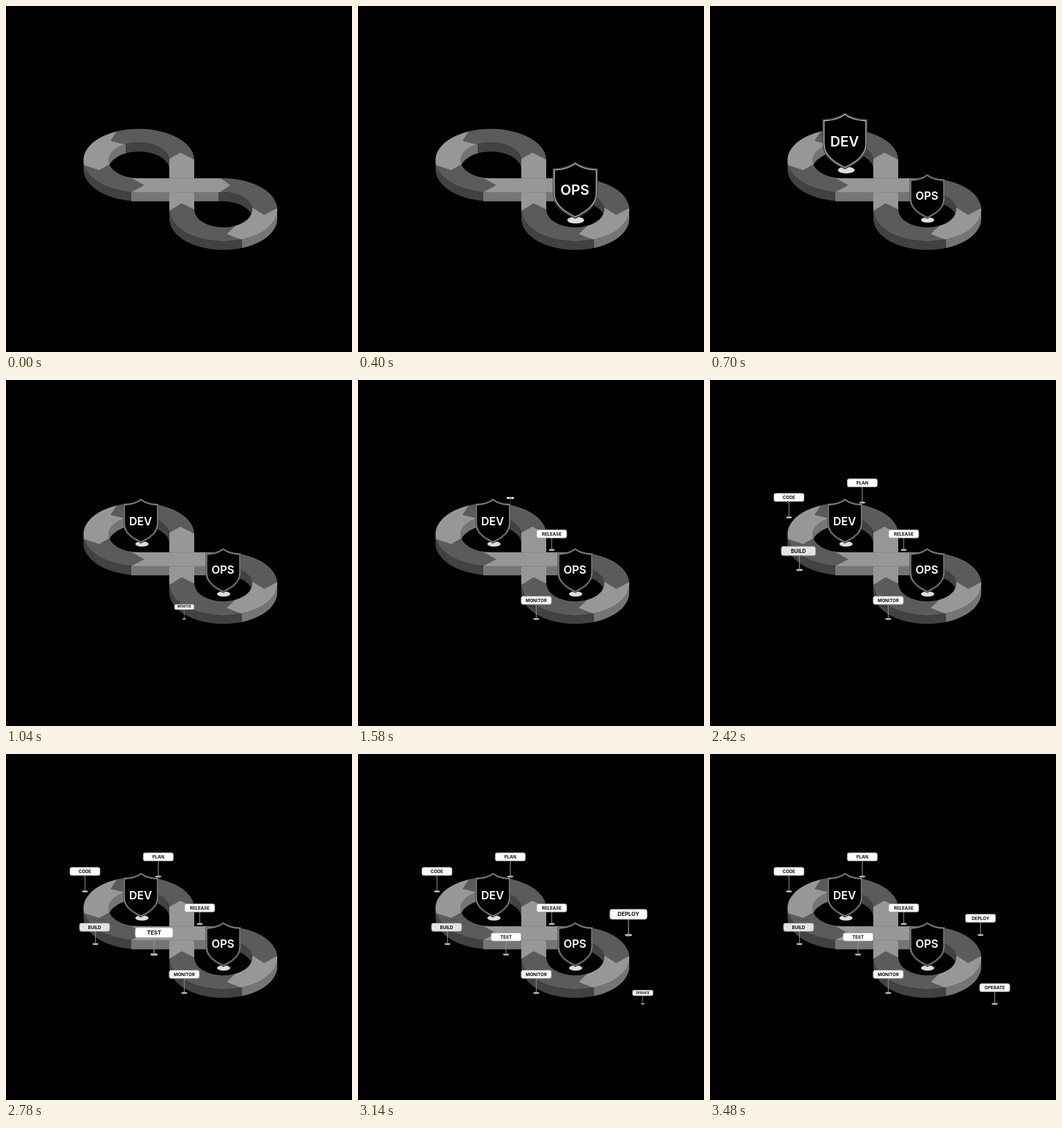
Recreate the animation shown at these times as an HTML page. Size 500 by 500 pixels, loop 3620 ms.

```html
<!DOCTYPE html>
<html lang="en">
<head>
<meta charset="utf-8">
<style>
html, body { margin: 0; width: 100%; height: 100%; overflow: hidden; background: #000; }
svg { display: block; width: 100vw; height: 100vh; }
text { font-family: Inter, "Liberation Sans", sans-serif; text-anchor: middle; }
.dark { fill: #5b5b5b; }
.light { fill: #979797; }
.wall { fill: #424242; }
.lightwall { fill: #757575; }
</style>
</head>
<body>
<svg viewBox="0 0 500 500">
  <defs>
    <path id="holeL" d="M236 223A44 26 0 0 0 148 223A44 26 0 0 0 192 249H236Z"/>
    <path id="holeR" d="M272 269H314A42 25.5 0 0 1 356 294.5A42 25.5 0 0 1 272 294.5Z"/>
    <path id="face" clip-rule="evenodd" fill-rule="evenodd" d="
      M272 223A80 45.5 0 0 0 112 223A80 46 0 0 0 192 269H236V294.5
      A78 45.5 0 0 0 392 294.5A78 45.5 0 0 0 314 249H272Z
      M236 223A44 26 0 0 0 148 223A44 26 0 0 0 192 249H236Z
      M272 269H314A42 25.5 0 0 1 356 294.5A42 25.5 0 0 1 272 294.5Z"/>
    <path id="rim" d="M236 294.5A78 45.5 0 0 0 392 294.5V307A78 45.5 0 0 1 236 307Z"/>
    <clipPath id="cFace"><use href="#face"/></clipPath>
    <clipPath id="cL"><use href="#holeL"/></clipPath>
    <clipPath id="cR"><use href="#holeR"/></clipPath>
    <clipPath id="cEast"><rect x="341" y="280" width="60" height="80"/></clipPath>
  </defs>
  <rect width="500" height="500"/>

  <g id="ring">
    <path class="wall" d="M112 223A80 46 0 0 0 192 269V282A80 46 0 0 1 112 236Z"/>
    <rect class="lightwall" x="181" y="268" width="126" height="14.3"/>
    <use href="#rim" class="wall"/>
    <use href="#rim" class="lightwall" clip-path="url(#cEast)"/>
    <g clip-path="url(#cL)">
      <rect class="wall" x="140" y="190" width="100" height="60"/>
      <rect class="lightwall" x="140" y="190" width="33" height="60"/>
      <use href="#holeL" y="13.3"/>
    </g>
    <g clip-path="url(#cR)">
      <rect class="wall" x="265" y="265" width="95" height="60"/>
      <rect class="lightwall" x="265" y="265" width="42" height="60"/>
      <use href="#holeR" y="13.3"/>
    </g>
    <use href="#face" class="dark"/>
    <g class="light" clip-path="url(#cFace)">
      <path d="M160 181L151 195L174 200.5V225L149 229L134.5 237L113 230H100V170H160Z"/>
      <path d="M356 291.5L373 302L392 292H400V350H341V338L319 329.5L331 318L340 300Z"/>
      <path d="M236 221L252 212L272 222V294L254 285L236 296Z"/>
      <path d="M181 248.5L200 259L181 269H309L324 259L310 249Z"/>
    </g>
    <path d="M200 249.2H310M200 269.2H307" fill="none" stroke="#7c7c7c" stroke-width=".6"/>
  </g>
  <g id="items"></g>
</svg>
<script>
const LOOP = 3620, RISE = 333, FALL = 167, PEAK = 1.27;
const SHIELD = 'M0-64.5Q-9-57.5-25-57V-29C-25-15-12-7 0-1C12-7 25-15 25-29V-57Q9-57.5 0-64.5Z';

// text, start, base x, base y, disc dx, disc dy, text baseline
const shields = [
  ['DEV', 385, 195, 236.5, 1.5, .5, -26.5],
  ['OPS', 60, 314, 308, .5, 1.2, -27.8]
];
// text, start, base x, base y, plate height, plate dx, plate fill
const signs = [
  ['MONITOR', 873, 257.6, 345.3, 27],
  ['RELEASE', 1070, 279.9, 245.4, 23],
  ['PLAN', 1490, 220.1, 177, 28.3],
  ['CODE', 1777, 114.1, 198.5, 28.8],
  ['BUILD', 2155, 129.3, 274.4, 24, -1.3, '#e4e4e2'],
  ['TEST', 2472, 214, 289.7, 25.3],
  ['DEPLOY', 2770, 390.9, 261.6, 24.3],
  ['OPERATE', 2967, 411.5, 361.1, 23.4]
];

const shieldArt = ([word, , , , dx, dy, base]) => `
  <ellipse cx="${dx}" cy="${dy}" rx="9.5" ry="3.8" fill="#dedfdd"/>
  <path d="${SHIELD}" stroke="#505050" stroke-width="1.4"/>
  <path d="${SHIELD}" transform="translate(0 -1.6) scale(.955)" fill="none" stroke="#dcdcdc" stroke-width=".9"/>
  <text x="-.5" y="${base}" font-size="16" font-weight="600" fill="#fff">${word}</text>`;

const signArt = ([word, , , , h, dx = 0, fill = '#fff']) => `
  <ellipse rx="4.3" ry="1.5" fill="#b4b4b4"/>
  <path d="M0 0V${-h}" stroke="#8c8c8c" stroke-width="1.1"/>
  <rect x="${dx - 21.8}" y="${-h - 5.9}" width="43.6" height="11.8" rx="2.8" fill="${fill}" stroke="#9a9a9a" stroke-width=".8"/>
  <text x="${dx}" y="${2.3 - h}" font-size="6.4" font-weight="700" fill="#111">${word}</text>`;

const layer = document.getElementById('items');
function add(item, art) {
  const node = document.createElementNS('http://www.w3.org/2000/svg', 'g');
  node.innerHTML = art(item);
  layer.append(node);
  return { node, start: item[1], x: item[2], y: item[3] };
}
const items = [...shields.map(s => add(s, shieldArt)), ...signs.map(s => add(s, signArt))];

function ease(p) {
  p = Math.min(1, Math.max(0, p));
  return p * p * (3 - 2 * p);
}
const pop = t => PEAK * ease(t / RISE) - (PEAK - 1) * ease((t - RISE) / FALL);

function draw(t) {
  for (const { node, start, x, y } of items) {
    const s = pop(t - start);
    node.setAttribute('visibility', s > 0 ? 'visible' : 'hidden');
    node.setAttribute('transform', `translate(${x} ${y}) scale(${s})`);
  }
}

const began = performance.now();
function tick() {
  draw((performance.now() - began) % LOOP);
  requestAnimationFrame(tick);
}
draw(0);
requestAnimationFrame(tick);
</script>
</body>
</html>
```
